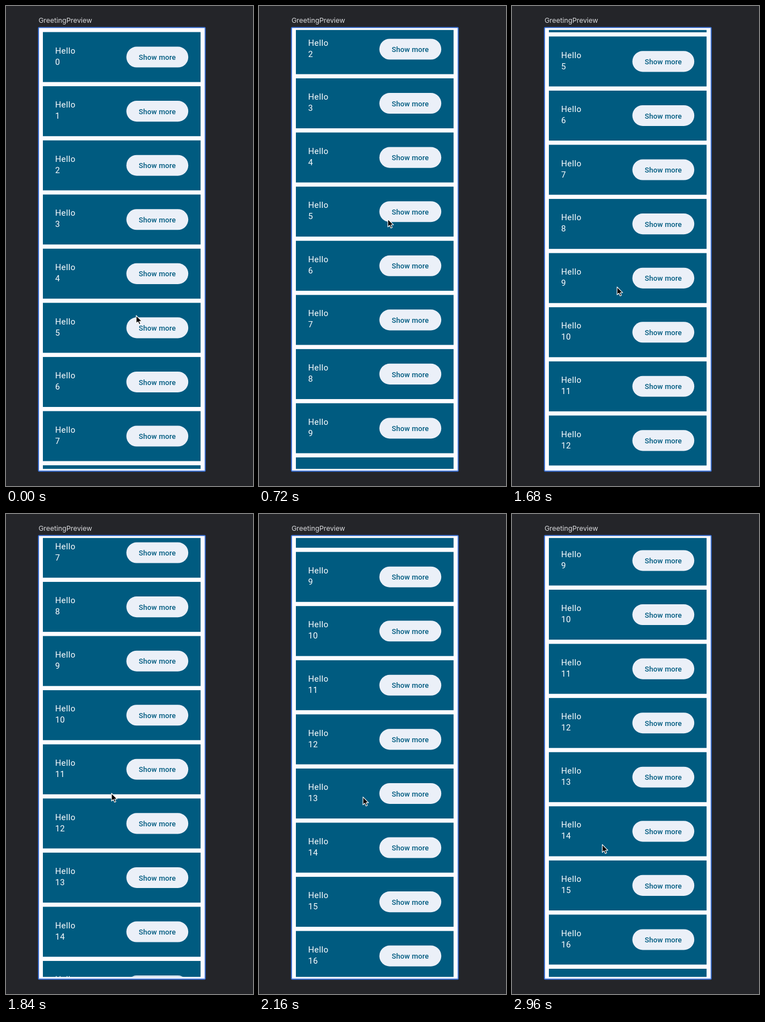
An HTML page that plays this animation: 442x856 px, repeating every 3040 ms.

```html
<!DOCTYPE html>
<html lang="en">
<head>
<meta charset="utf-8">
<title>Scrolling list preview</title>
<style>
  html, body { margin: 0; width: 100%; height: 100%; overflow: hidden; background: #242529; }
  svg { display: block; width: 442px; height: 856px; }
  .title { font: 12.3px Inter, sans-serif; fill: #d9dadd; }
  .frame { fill: #fdfcff; stroke: #3a73db; stroke-width: 1.8; }
  .card { fill: #005b80; }
  .pill { fill: #ebf0f8; }
  .body { font: 14.86px Roboto, sans-serif; letter-spacing: .46px; fill: #fff; }
  .action { font: 500 13px Roboto, sans-serif; letter-spacing: .09px; fill: #005b80; }
  .pointer { fill: #000; stroke: #fff; stroke-width: 1.1; stroke-linejoin: round; }
</style>
</head>
<body>
<svg viewBox="0 0 442 856">
  <defs>
    <clipPath id="viewport"><rect x="59" y="42.8" width="297" height="782.8"/></clipPath>
  </defs>
  <text class="title" x="58.2" y="30">GreetingPreview</text>
  <rect class="frame" x="58.2" y="38.3" width="298.2" height="791.2" rx="1"/>
  <g clip-path="url(#viewport)"><g id="list"></g></g>
  <path id="pointer" class="pointer" d="M0 0V14L3.2 11.1L5.4 16L7.8 15L5.7 10.2H10Z"/>
</svg>
<script>
const LOOP = 3040, STEP = 80;
const PITCH = 96.57, FIRST_TOP = 46.5, CARDS = 19;

// [time, scroll offset]
const scrollKeys = [
  [0, 0], [80, 16], [160, 56], [240, 108], [320, 154], [400, 188], [480, 203], [560, 207.2],
  [1520, 207.2], [1600, 310], [1680, 475], [1760, 604], [1840, 698], [1920, 757], [2000, 800.7],
  [2080, 829], [2160, 848], [2240, 862], [2320, 870.8], [2400, 874], [2560, 876.6], [2720, 877.2]
];

// [time, x, y]
const pointerKeys = [
  [0, 233, 552], [80, 233, 536], [160, 232.6, 497], [240, 232, 448], [320, 231.4, 408],
  [400, 231, 386], [480, 230.6, 380], [960, 230.6, 380], [1120, 220, 415], [1280, 198, 485],
  [1440, 183, 523], [1520, 182.6, 523], [1600, 185, 514], [1680, 188, 501], [1760, 188.8, 498],
  [2080, 188.8, 498], [2320, 180.6, 518], [2560, 171, 552], [2800, 162, 586], [2880, 161.5, 589.5]
];

function sample(keys, t) {
  const next = keys.findIndex(k => k[0] > t);
  if (next < 0) return keys[keys.length - 1].slice(1);
  const a = keys[next - 1], b = keys[next];
  const p = (t - a[0]) / (b[0] - a[0]);
  return a.slice(1).map((v, i) => v + (b[i + 1] - v) * p);
}

const list = document.getElementById('list');
const pointer = document.getElementById('pointer');

function add(parent, tag, attrs, text = '') {
  const el = document.createElementNS('http://www.w3.org/2000/svg', tag);
  for (const name in attrs) el.setAttribute(name, attrs[name]);
  el.textContent = text;
  return parent.appendChild(el);
}

for (let i = 0; i < CARDS; i++) {
  const g = add(list, 'g', { transform: `translate(0 ${FIRST_TOP + i * PITCH})` });
  add(g, 'rect', { class: 'card', x: 66, y: 0, width: 282.2, height: 89.1 });
  add(g, 'text', { class: 'body', x: 88, y: 38.2 }, 'Hello');
  add(g, 'text', { class: 'body', x: 88, y: 58.2 }, i);
  add(g, 'rect', { class: 'pill', x: 215.4, y: 26, width: 110.8, height: 37.1, rx: 18.55 });
  add(g, 'text', { class: 'action', x: 237.6, y: 49.7 }, 'Show more');
}

function draw() {
  const t = Math.floor(performance.now() % LOOP / STEP) * STEP;
  const [offset] = sample(scrollKeys, t);
  const [x, y] = sample(pointerKeys, t);
  list.setAttribute('transform', `translate(0 ${-offset})`);
  pointer.setAttribute('transform', `translate(${x} ${y})`);
  requestAnimationFrame(draw);
}
draw();
</script>
</body>
</html>
```
